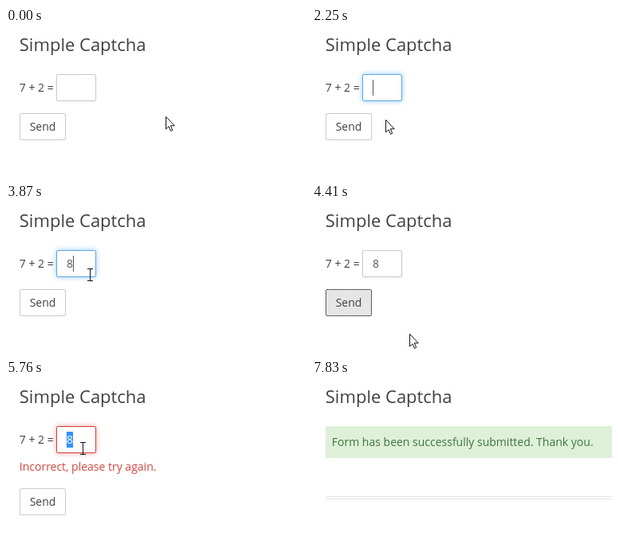
Recreate the animation shown at these times as an HTML page. Size 376 by 186 pixels, loop 9270 ms.

```html
<!DOCTYPE html>
<html lang="en">
<head>
<meta charset="utf-8">
<title>Simple Captcha</title>
<style>
  html, body { margin: 0; width: 100%; height: 100%; overflow: hidden; background: #fff; }
  svg { display: block; font: 14px "Open Sans", "Noto Sans", sans-serif; fill: #404044; }
  [hidden] { display: none; }
  .line { fill: none; stroke: #111; }
</style>
</head>
<body>
<svg width="376" height="186" viewBox="0 0 376 186">
  <text x="16.8" y="29" font-size="22">Simple Captcha</text>

  <g id="form">
    <text x="16.8" y="80">7 + 2 =</text>
    <rect id="field" x="63.5" y="58.5" width="49" height="33" rx="1.5" fill="#fff"/>
    <rect id="selection" x="76" y="65" width="8" height="20" fill="#3390ff"/>
    <text id="value" x="76" y="80"></text>
    <path id="caret" d="M0 65V85" stroke="#555"/>
    <text id="error" x="16.8" y="114" fill="#d2453f">Incorrect, please try again.</text>
    <g id="button">
      <rect id="face" x="17.5" y="107.5" width="57" height="33" rx="1.5"/>
      <rect id="dots" class="line" x="17.5" y="107.5" width="57" height="33" rx="1.5" stroke-dasharray="1 1"/>
      <text x="29.7" y="129">Send</text>
    </g>
    <g id="tip">
      <path d="M47.5 100.5H54.5L63.5 92.5L72.5 100.5H200.5V143.5H47.5Z" fill="#fff" stroke="#d8d8d8"
        style="filter:drop-shadow(0 1px 1.5px rgba(0,0,0,.18))"/>
      <text x="64" y="125" font-size="11.3" fill="#000">Please fill out this field.</text>
    </g>
    <g id="pointer">
      <path id="arrow" d="M.5 .5V16L4 12.7L6.4 18.4L8.7 17.4L6.3 11.8H11.3Z" fill="#fff" stroke="#111"/>
      <path id="beam" class="line" d="M-3-7.5H4M.5-7.5V7.5M-3 7.5H4"/>
    </g>
  </g>

  <g id="done">
    <rect x="17" y="58" width="359" height="40" fill="#dff0d8"/>
    <text x="24.8" y="83" fill="#3c763d">Form has been successfully submitted. Thank you.</text>
    <path d="M17 146.5H376M17 149.5H376" stroke="#e6e6e6"/>
  </g>
</svg>
<script>
const LOOP = 9270, STEP = 90;
const FOCUS = [1020, 2820, 5640], CLICK = [2610, 4230, 7200];
const TYPE_8 = 3870, ERROR = 4680, SELECT = 5760, ERASE = 6570, TYPE_9 = 6930, DONE = 7830;
const el = {};
document.querySelectorAll('[id]').forEach(e => el[e.id] = e);

// Pointer moves; sag bends the way down (or up when negative)
const origin = [200, 111];
const moves = [
  { from: 270, to: 1170, end: [104, 82], sag: 55 },
  { from: 1890, to: 2250, end: [92, 115], sag: 0 },
  { from: 2430, to: 2880, end: [50, 134], sag: 10 },
  { from: 3240, to: 3690, end: [105, 89], sag: -45 },
  { from: TYPE_8, to: 4320, end: [50, 132], sag: 0 },
  { from: 4320, to: 4950, end: [322, 80], sag: 60 },
  { from: 5130, to: 5850, end: [92, 86], sag: 0 },
  { from: 6480, to: 6750, end: [196, 87], sag: 0 },
  { from: 6840, to: 7245, end: [50, 158], sag: -3 }
];

const within = (t, a, b) => t >= a && t < b;
const ramp = (t, a, b) => Math.min(1, Math.max(0, (t - a) / (b - a)));
const easeOut = k => 1 - (1 - k) ** 2;
const mix = (a, b, k) => a.map((v, i) => v + (b[i] - v) * k);
const lastBefore = (t, times) => Math.max(0, ...times.filter(s => s <= t));
const show = (e, on) => e.toggleAttribute('hidden', !on);
const place = (e, x, y) => e.setAttribute('transform', `translate(${x} ${y})`);

function pointerAt(t) {
  let pos = origin;
  for (const { from, to, end, sag } of moves) {
    const k = easeOut(ramp(t, from, to));
    pos = mix(pos, end, k);
    pos[1] += sag * Math.sin(Math.PI * k);
  }
  return pos.map(Math.round);
}

function drawField(t, focused) {
  const red = ramp(t, ERROR, 4950);
  const fade = times => times.reduce((sum, s) => sum + ramp(t, s, s + 150), 0);
  const focus = fade(FOCUS) - fade(CLICK);
  const rest = mix([200, 203, 208], [207, 76, 66], red);
  const lit = mix([92, 167, 222], [205, 62, 54], red);
  const glow = mix([82, 168, 236], [226, 66, 58], red);
  el.field.style.stroke = `rgb(${mix(rest, lit, focus)})`;
  el.field.style.filter = focus > .5
    ? `drop-shadow(0 0 3.5px rgba(${glow},${.6 * focus}))`
    : 'drop-shadow(0 1px 1px rgba(0,0,0,.07))';

  const text = within(t, TYPE_8, ERASE) ? '8' : t >= TYPE_9 ? '9' : '';
  const selected = within(t, SELECT, ERASE);
  el.value.textContent = text;
  el.value.style.fill = selected ? '#fff' : '#555';
  show(el.selection, selected);

  const blinkStart = lastBefore(t, [...FOCUS, TYPE_8, ERASE, TYPE_9]);
  show(el.caret, focused && !selected && (t - blinkStart) % 1000 < 500);
  place(el.caret, text ? 84.5 : 76.5, 0);
}

function drawPointer(t, failed) {
  const [x, y] = pointerAt(t);
  const overText = within(x, 63, 113) && within(y, 58, 92)
    || failed && within(x, 16, 188) && within(y, 102, 118);
  place(el.pointer, x, y);
  show(el.arrow, !overText);
  show(el.beam, overText);
}

function draw(t) {
  show(el.form, t < DONE);
  show(el.done, t >= DONE);
  if (t >= DONE) return;

  const failed = t >= ERROR;
  const focused = lastBefore(t, FOCUS) > lastBefore(t, CLICK);
  const pressed = t >= CLICK[0] && !focused;
  drawField(t, focused);
  drawPointer(t, failed);

  show(el.error, failed);
  place(el.button, 0, failed ? 29 : 0);
  el.face.style.fill = pressed ? '#e6e6e6' : '#fff';
  el.face.style.stroke = pressed ? '#adadad' : '#c8cbd0';
  show(el.dots, pressed);

  const tip = ramp(t, 2680, 2910) - ramp(t, 3240, 3510);
  show(el.tip, tip > 0);
  el.tip.style.opacity = tip;
}

const start = performance.now();
function tick() {
  const t = (performance.now() - start) % LOOP;
  draw(Math.floor(t / STEP) * STEP);
  requestAnimationFrame(tick);
}
tick();
</script>
</body>
</html>
```
